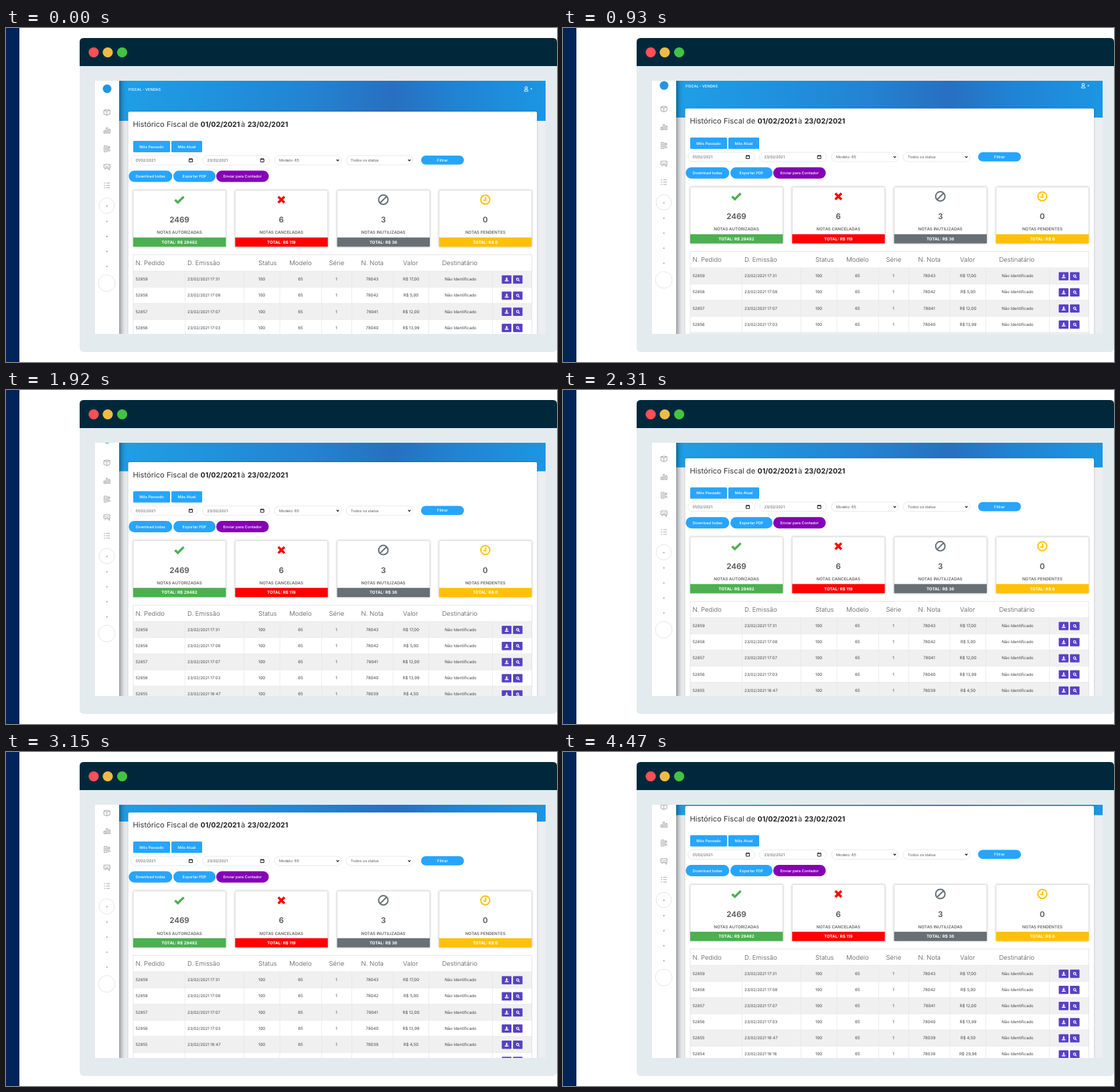
An HTML page that plays this animation: 823x500 px, repeating every 4500 ms.

```html
<!DOCTYPE html>
<html lang="pt-BR">
<head>
<meta charset="utf-8">
<style>
html, body { margin: 0; width: 100%; height: 100%; overflow: hidden; background: #fff; }
svg { display: block; }
text { font-family: Inter, "Open Sans", sans-serif; text-rendering: geometricPrecision; white-space: pre; }
.icon { fill: none; stroke: #a0a0a0; stroke-width: .9; }
.soft { filter: drop-shadow(0 0 1.5px rgba(0,0,0,.22)); }
.side { filter: drop-shadow(2px 0 4px rgba(0,0,0,.5)); }
</style>
</head>
<body>
<svg id="stage" width="823" height="500" viewBox="0 0 823 500"></svg>
<script>
const rect = (x, y, w, h, fill, r = 0, extra = '') =>
  `<rect x="${x}" y="${y}" width="${w}" height="${h}" rx="${r}" fill="${fill}" ${extra}/>`;
const circle = (x, y, r, fill, extra = '') =>
  `<circle cx="${x}" cy="${y}" r="${r}" fill="${fill}" ${extra}/>`;
const path = (d, x, y, extra = 'class="icon"') =>
  `<path d="${d}" transform="translate(${x} ${y})" ${extra}/>`;
const text = (s, x, y, size, fill, weight = 400, anchor = 'start') =>
  `<text x="${x}" y="${y}" font-size="${size}" fill="${fill}" font-weight="${weight}" text-anchor="${anchor}">${s}</text>`;
const center = (s, x, y, size, fill, weight) => text(s, x, y, size, fill, weight, 'middle');
const line = (color, width) => `fill="none" stroke="${color}" stroke-width="${width}"`;

const BLUE = '#27a5fc';
const button = (s, x, y, w, h, r, fill = BLUE) =>
  rect(x, y, w, h, fill, r) + center(s, x + w / 2, y + h / 2 + 2, 5.7, '#fff', 500);

function header() {
  return rect(169, 70, 637, 69, 'url(#sky)') +
    text('FISCAL - VENDAS', 183, 93.6, 5.6, '#fff', 500) +
    circle(777, 89.6, 1.8, 'none', 'stroke="#fff"') +
    path('M-2.7 3.7V2.5Q-2.7 .8 0 .8T2.7 2.5V3.7Z', 777, 91, line('#fff', .9)) +
    path('M-1.6 -.7H1.6L0 1Z', 784.7, 91.3, 'fill="#fff"');
}

function sidebar() {
  const icons = [
    'M-4.5-2.8L0-4 4.5-2.8V3L0 4.5-4.5 3ZM-4.5-2.8L0-1.5 4.5-2.8M0-1.5V4.5',
    'M-4.5 0h2v4h-2zM-1-4h2v8h-2zM2.7-2h2v6h-2z',
    'M-4-4.5H0V4.5H-4ZM-2-3V3M2-4.5V4.5M4-4V0M2-2H4.5M2 2H4.5V4',
    'M-4.5-4H4.5V1.5H-4.5ZM-3-2L0 0 3-2M-3 4L-1 1.5M1 2L4 4.5M4 2V4.5',
    'M-4.5-3.5h2M-4.5 0h2M-4.5 3.5h2M-1-3.5H4.5M-1 0H4.5M-1 3.5H4.5'
  ];
  const ring = 'stroke="#e3e3e3" stroke-width=".9"';
  return rect(123, 60, 46, 480, '#fff', 0, 'class="side"') +
    circle(151, 91, 6.5, '#2196e3') +
    icons.map((d, i) => path(d, 150.7, 126 + i * 27.4)).join('') +
    circle(150.5, 266, 11.5, '#fff', ring) + circle(150.5, 382, 12.5, '#fff', ring) +
    [266.5, 289.5, 312, 334.5, 357].map(y => circle(150.7, y, .9, '#888')).join('');
}

function filters() {
  const field = (s, x) => rect(x, 191, 100, 14, '#fff', 7, 'stroke="#e4e4e4" stroke-width=".8"') +
    text(s, x + 7, 200, 5.6, '#555');
  const calendar = x => path('M-2.5-2H2.5V2.5H-2.5ZM-2.5-1.5H2.5M-1.4-3V-2M1.4-3V-2', x, 198, line('#222', 1));
  const arrow = x => path('M-1.8-1L0 .9 1.8-1', x, 198, line('#222', 1.2));
  return text('Histórico Fiscal de', 189.5, 148, 11.2, '#333') +
    text('01/02/2021', 290.5, 148, 10.6, '#222', 700) + text('à', 351, 148, 11.2, '#333') +
    text('23/02/2021', 360.7, 148, 10.6, '#222', 700) +
    button('Mês Passado', 190, 169, 55, 17, 1.5) + button('Mês Atual', 247, 169, 46, 17, 1.5) +
    field('01/02/2021', 186.5) + field('23/02/2021', 293.5) +
    field('Modelo: 65', 401) + field('Todos os status', 508) +
    calendar(276) + calendar(382.7) + arrow(495.5) + arrow(602.5) +
    button('Filtrar', 620, 191, 64, 13.6, 6.8) +
    button('Download todas', 183.3, 213.5, 65, 17, 8.5) +
    button('Exportar PDF', 250, 213.5, 63, 17, 8.5) +
    button('Enviar para Contador', 314, 213.5, 78.5, 17, 8.5, '#8500b6');
}

function summary() {
  const cards = [
    ['2469', 'AUTORIZADAS', '29482', '#4caf50', 'M-6.5 .2L-2.3 4.2 6.5-4.5', 3.4],
    ['6', 'CANCELADAS', '119', '#ff0000', 'M-4.6-4.6L4.6 4.6M4.6-4.6L-4.6 4.6', 3.6],
    ['3', 'INUTILIZADAS', '36', '#687076', 'M-7 0a7 7 0 1 0 14 0a7 7 0 1 0-14 0M4.8-4.8L-4.8 4.8', 2],
    ['0', 'PENDENTES', '0', '#ffc107', 'M-6.7 0a6.7 6.7 0 1 0 13.4 0a6.7 6.7 0 1 0-13.4 0M.5-4V.8H-3', 2]
  ];
  return cards.map(([count, label, total, color, icon, width], i) => {
    const x = 190 + i * 152.3, mid = x + 69;
    return rect(x, 243, 138.4, 84.4, '#fff', 1.5, 'stroke="#dedede" stroke-width=".9" class="soft"') +
      path(icon, mid, 257, line(color, width)) +
      center(count, mid, 291, 11.6, '#555', 600) +
      center('NOTAS ' + label, mid, 308.4, 6.2, '#666', 600) +
      rect(x, 313.6, 138.4, 13.8, color) +
      center('TOTAL: R$ ' + total, mid, 322.8, 6.2, '#fff', 700);
  }).join('');
}

function table() {
  const heads = { 'N. Pedido': 193.5, 'D. Emissão': 271, Status: 377, Modelo: 423.3, 'Série': 482.5,
    'N. Nota': 530.5, Valor: 593, 'Destinatário': 651.5 };
  const rows = [['17:31', '17,00'], ['17:08', '5,00'], ['17:07', '12,00'],
    ['17:03', '13,99'], ['16:47', '4,50'], ['16:16', '29,98']];
  const rowHeight = 24.15, top = 364, ink = '#444';
  const frame = rect(190, 339.5, 595.5, 24.5 + rows.length * rowHeight, 'none', 0, 'stroke="#e2e2e2" stroke-width=".9"');
  const titles = Object.entries(heads).map(([s, x]) => text(s, x, 355.3, 9.5, '#555', 300)).join('');
  const body = rows.map(([time, value], i) => {
    const y = top + i * rowHeight, base = y + 14.2;
    const cells = [['100', 382], ['65', 440], ['1', 493.5], [78043 - i, 547], ['R$ ' + value, 605], ['Não Identificado', 679]];
    return rect(190, y, 595.5, rowHeight, i % 2 ? '#fff' : '#f0f0f0') +
      path(`M0 0H595.5M77.5 0${[77.5, 165.5, 219, 281.5, 326.5, 388, 441.5, 536.5].map(x => `M${x} 0V${rowHeight}`).join('')}`, 190, y, line('#e7e7e7', .8)) +
      text(52859 - i, 193.5, base, 6, ink) + text('23/02/2021 ' + time, 271, base, 6, ink) +
      cells.map(([s, x]) => center(s, x, base, 6.1, ink)).join('') +
      rect(740.5, y + 6.3, 14.5, 12.4, '#5840c4', 1) + rect(757.3, y + 6.3, 14.2, 12.4, '#5840c4', 1) +
      path('M-.8-3H.8V-.8H2.2L0 1.3-2.2-.8H-.8ZM-2.8 1.3H2.8V2.8H-2.8Z', 747.8, y + 12.5, 'fill="#fff"') +
      path('M1.3-.4a1.7 1.7 0 1 0-3.4 0a1.7 1.7 0 1 0 3.4 0M.8 .9L2.6 2.7', 764.6, y + 12.5, line('#fff', 1.1));
  }).join('');
  return body + frame + titles;
}

const stops = [[0, '#1f9fe6'], [.25, '#2090dc'], [.45, '#2383d2'], [.64, '#286fc0'], [.78, '#2182d2'], [1, '#1c96e2']];

stage.innerHTML = `
<defs><linearGradient id="sky">${stops.map(([o, c]) => `<stop offset="${o}" stop-color="${c}"/>`).join('')}</linearGradient></defs>
${rect(0, 0, 20, 500, '#00235a')}
${rect(110, 15, 713, 470, '#e4ebee', 6)}
<path d="M110 57V21q0-6 6-6H817q6 0 6 6V57Z" fill="#00283a"/>
${circle(131, 36.5, 7.6, '#ff5056')}${circle(152, 36.5, 7.6, '#eebc45')}${circle(173.5, 36.5, 7.6, '#43c344')}
<svg x="133" y="79" width="673" height="379" viewBox="133 79 673 379">
  ${rect(133, 79, 673, 379, '#eceef1')}
  <g id="page">${header()}${sidebar()}
    ${rect(182.5, 125.3, 610.5, 420, '#fff', 2, 'class="soft"')}
    ${filters()}${summary()}${table()}</g>
</svg>`;

const page = document.getElementById('page');
const LOOP = 4500, STEP = 30, DISTANCE = 44.5;

function draw(now) {
  const p = Math.floor(now % LOOP / STEP) * STEP / LOOP;
  const eased = p * p * (3 - 2 * p);
  page.setAttribute('transform', `translate(0 ${-DISTANCE * eased})`);
  requestAnimationFrame(draw);
}
requestAnimationFrame(draw);
</script>
</body>
</html>
```
